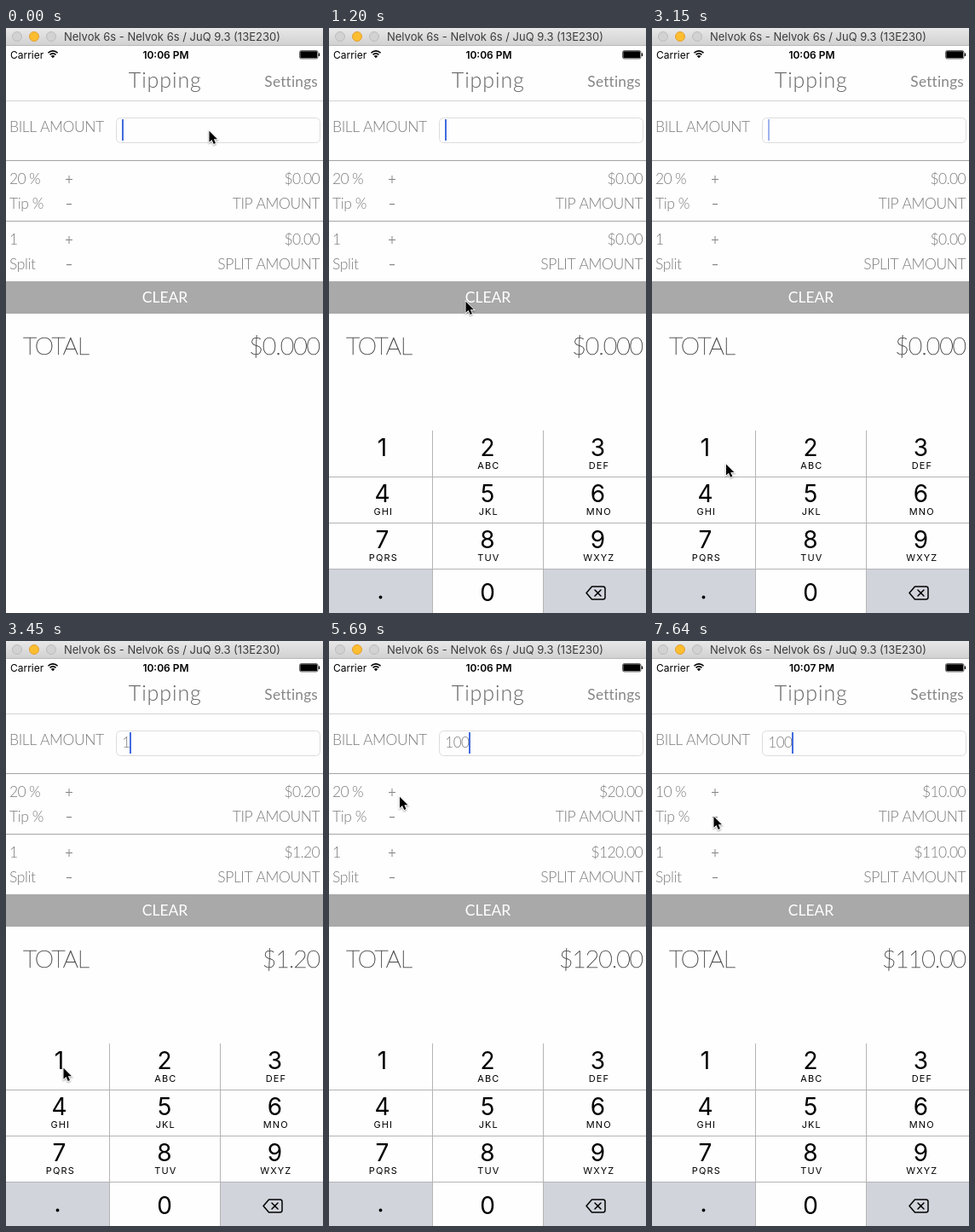
Recreate the animation shown at these times as an HTML page with a canvas. Size 372 by 686 pixels, loop 8 s.

```html
<!DOCTYPE html>
<html lang="en">
<head>
<meta charset="utf-8">
<title>Tip calculator</title>
<style>
  html, body { margin: 0; width: 100%; height: 100%; overflow: hidden; background: #fefefe; }
  canvas { display: block; width: 372px; height: 686px; }
</style>
</head>
<body>
<canvas id="stage"></canvas>
<script>
const W = 372, H = 686, LOOP = 8000;
const THIN = 'Lato, "Open Sans", sans-serif';
const SYSTEM = 'Inter, Roboto, sans-serif';
const KEY_GRAY = '#d1d4db';
const DIGIT_WIDTH = 28 / 3;
const canvas = document.getElementById('stage');
const ctx = canvas.getContext('2d');
const ratio = window.devicePixelRatio || 1;
canvas.width = W * ratio;
canvas.height = H * ratio;

// Pointer path: [time, x, y]
const pointerPath = [
  [0, 238, 120], [750, 238, 120], [1200, 160, 320], [1650, 81, 490], [1950, 158, 518],
  [2550, 158, 518], [2850, 142, 541], [3300, 67, 500], [3450, 67, 500], [3600, 109, 535],
  [4050, 204, 667], [4950, 204, 667], [5690, 82.5, 182], [6140, 72, 205]
];
// Caret opacity, held until the next entry: [time, alpha]
const caretBlink = [
  [0, 1], [300, .5], [450, 0], [900, .5], [1050, 1], [1350, .5], [1500, 0],
  [1800, .5], [1950, 1], [2250, .5], [2400, 0], [2700, .5], [2850, 1], [3150, .5],
  [3300, 1], [5100, .5], [5240, 0], [5540, .5], [5690, 1], [5990, .5], [6140, 0],
  [6440, .5], [6590, 1], [6890, .5], [7040, 0], [7490, .5], [7640, 1]
];
const billEntry = [[0, ''], [3300, '1'], [4200, '10'], [4500, '100']];

const held = (list, t) => list.filter(entry => entry[0] <= t).pop()[1];
const money = value => '$' + value.toFixed(2);

// The picture refreshes every 150 ms, with one short tick after 5100.
function snap(t) {
  if (t < 5100) return Math.floor(t / 150) * 150;
  return t < 5240 ? 5100 : 5240 + Math.floor((t - 5240) / 150) * 150;
}

function pointerAt(t) {
  const next = pointerPath.findIndex(p => p[0] > t);
  if (next < 0) return pointerPath[pointerPath.length - 1].slice(1);
  const [t0, x0, y0] = pointerPath[next - 1], [t1, x1, y1] = pointerPath[next];
  const k = (t - t0) / (t1 - t0), ease = k * k * (3 - 2 * k);
  return [x0 + (x1 - x0) * ease, y0 + (y1 - y0) * ease];
}

function text(str, x, y, { size = 17.5, weight = 300, family = THIN, color = '#777', align = 'left', spacing = 0, embolden = 0 } = {}) {
  ctx.font = `${weight} ${size}px ${family}`;
  ctx.letterSpacing = spacing + 'px';
  ctx.textAlign = align;
  ctx.fillStyle = ctx.strokeStyle = color;
  ctx.fillText(str, x, y);
  if (!embolden) return;
  ctx.lineWidth = embolden;
  ctx.lineJoin = 'round';
  ctx.strokeText(str, x, y);
}

function rect(x, y, w, h, color) {
  ctx.fillStyle = color;
  ctx.fillRect(x, y, w, h);
}

function dot(x, y, r, fill, border) {
  ctx.beginPath();
  ctx.arc(x, y, r, 0, Math.PI * 2);
  ctx.fillStyle = fill;
  ctx.fill();
  if (!border) return;
  ctx.strokeStyle = border;
  ctx.lineWidth = 1;
  ctx.stroke();
}

function drawTitleBar() {
  const shade = ctx.createLinearGradient(0, 0, 0, 20);
  shade.addColorStop(0, '#e9e8e9');
  shade.addColorStop(1, '#d2d1d2');
  rect(0, 0, W, 20, shade);
  rect(0, 20, W, 1, '#b9b8b9');
  dot(13, 10, 5.5, '#d3d2d3', '#bdbcbd');
  dot(33, 10, 5.5, '#fdbd30', '#e2a032');
  dot(53, 10, 5.5, '#d3d2d3', '#bdbcbd');
  text('Nelvok 6s - Nelvok 6s / JuQ 9.3 (13E230)', 68, 15, { size: 13, weight: 400, family: SYSTEM, color: '#3c3c3c' });
}

function drawBattery() {
  ctx.beginPath();
  ctx.roundRect(344.5, 26.5, 21.5, 9.5, 2);
  ctx.strokeStyle = '#000';
  ctx.lineWidth = .6;
  ctx.stroke();
  ctx.beginPath();
  ctx.roundRect(345.3, 27.3, 19.9, 7.9, 1);
  ctx.fillStyle = '#000';
  ctx.fill();
  rect(366.8, 29.5, 1.3, 3.5, '#000');
}

function drawStatusBar(clock) {
  text('Carrier', 5, 35.5, { size: 12, weight: 400, family: SYSTEM, color: '#000' });
  text(clock, 187.5, 35.5, { size: 12, weight: 600, family: SYSTEM, color: '#000', align: 'center' });
  ctx.strokeStyle = '#000';
  ctx.lineWidth = 1.6;
  for (const r of [4.9, 7.9]) {
    ctx.beginPath();
    ctx.arc(55, 34.8, r, -Math.PI * .75, -Math.PI * .25);
    ctx.stroke();
  }
  ctx.beginPath();
  ctx.moveTo(55, 35.3);
  ctx.arc(55, 35.3, 3.2, -Math.PI * .75, -Math.PI * .25);
  ctx.fillStyle = '#000';
  ctx.fill();
  drawBattery();
}

function drawPlusMinus(y, minusAlpha) {
  rect(70, y, 8, 1, '#858585');
  rect(73.5, y - 4, 1, 9, '#858585');
  ctx.globalAlpha = minusAlpha;
  rect(71, y + 29, 6, 1.2, '#858585');
  ctx.globalAlpha = 1;
}

function drawForm(t) {
  const bill = held(billEntry, t);
  const amount = Number(bill);
  const clicks = Math.max(0, Math.min(7, Math.floor((t - 6440) / 150) + 1));
  const percent = 20 - Math.round(clicks * 10 / 7);
  const tip = amount * percent / 100, total = amount + tip;
  const label = { size: 17.5, color: '#7c7c7c', spacing: -.42 };
  const digits = { size: 17.5, color: '#7c7c7c', spacing: -.65 };
  const right = style => ({ ...style, align: 'right' });

  text('Tipping', 186.8, 70, { size: 25, color: '#666', spacing: .9, align: 'center' });
  text('Settings', 366, 69, { size: 17.3, weight: 400, color: '#868686', align: 'right', spacing: .2 });
  rect(0, 85, W, 1, '#d4d4d4');

  text('BILL AMOUNT', 4, 122, label);
  ctx.beginPath();
  ctx.roundRect(129.5, 105.5, 239, 29, 5);
  ctx.strokeStyle = '#dcdcdc';
  ctx.lineWidth = 1;
  ctx.stroke();
  text(bill, 136.3, 125, { size: 17, color: '#7c7c7c', spacing: -.53 });
  ctx.globalAlpha = held(caretBlink, t);
  rect(136 + Math.round(bill.length * DIGIT_WIDTH), 107, 2, 25, '#426bde');
  ctx.globalAlpha = 1;

  rect(0, 155, W, 1, '#a5a5a5');
  text(percent + ' %', 4, 183, digits);
  text('Tip %', 4, 212, label);
  text(money(tip), 368, 183, right(digits));
  text('TIP AMOUNT', 368.3, 212, right(label));
  drawPlusMinus(177, t >= 6440 && t < 7640 ? .35 : 1);

  rect(0, 226, W, 1, '#a5a5a5');
  text('1', 4, 254, digits);
  text('Split', 4, 283, label);
  text(money(total), 368, 254, right(digits));
  text('SPLIT AMOUNT', 368.3, 283, right(label));
  drawPlusMinus(248, 1);

  rect(0, 297, W, 38, '#a9a9a9');
  text('CLEAR', 186.5, 322, { weight: 400, color: '#fff', align: 'center' });

  const big = { size: 28.5, weight: 200, color: '#4a4a4a', spacing: -1.1, embolden: .5 };
  text('TOTAL', 20, 383, big);
  text(bill ? money(total) : '$0.000', 368, 383, right(big));
}

function drawBackspace(x, y) {
  ctx.strokeStyle = '#000';
  ctx.lineWidth = 1.5;
  ctx.lineJoin = ctx.lineCap = 'round';
  ctx.beginPath();
  ctx.moveTo(x - 11, y);
  ctx.lineTo(x - 4.5, y - 7.5);
  ctx.arcTo(x + 11, y - 7.5, x + 11, y, 2.5);
  ctx.arcTo(x + 11, y + 7.5, x, y + 7.5, 2.5);
  ctx.lineTo(x - 4.5, y + 7.5);
  ctx.closePath();
  for (const s of [-1, 1]) {
    ctx.moveTo(x - 1, y - 3.5 * s);
    ctx.lineTo(x + 6, y + 3.5 * s);
  }
  ctx.stroke();
}

function drawKeyboard(t) {
  if (t < 750) return;
  const letters = ['', 'ABC', 'DEF', 'GHI', 'JKL', 'MNO', 'PQRS', 'TUV', 'WXYZ'];
  const centers = [62.5, 186, 315.5];
  const digit = { size: 28, weight: 400, family: SYSTEM, color: '#000', align: 'center' };
  const small = { size: 11, weight: 400, family: SYSTEM, color: '#000', align: 'center', spacing: 1.1 };

  ctx.save();
  ctx.translate(0, t < 900 ? 15 : t < 1050 ? 2 : 0);
  rect(0, 472, W, 230, '#fefefe');
  rect(0, 634, 121, 68, KEY_GRAY);
  rect(252, 634, 120, 68, KEY_GRAY);
  if (t >= 3300 && t < 3450) rect(0, 472, 121, 54, KEY_GRAY);
  if (t >= 4200 && t < 4500) rect(122, 634, 129, 68, KEY_GRAY);
  for (const y of [526, 580, 634]) rect(0, y, W, 1, '#b4b4b6');
  for (const x of [121, 251]) rect(x, 472, 1, 230, '#b4b4b6');

  letters.forEach((group, i) => {
    const x = centers[i % 3], y = 502 + Math.floor(i / 3) * 54;
    text(String(i + 1), x, y, digit);
    text(group, x + 1.3, y + 15, small);
  });
  text('0', 186, 672, digit);
  dot(60.5, 667.5, 1.9, '#000');
  drawBackspace(313, 662.5);
  ctx.restore();
}

function drawPointer(t) {
  const [x, y] = pointerAt(t);
  const outline = [[0, 0], [0, 14.2], [3.3, 11.2], [5.7, 16.6], [8.1, 15.5], [5.8, 10.4], [10.3, 10.4]];
  ctx.save();
  ctx.translate(x + .5, y + .8);
  ctx.scale(.92, .92);
  ctx.beginPath();
  outline.forEach(p => ctx.lineTo(...p));
  ctx.closePath();
  ctx.lineJoin = 'miter';
  ctx.lineWidth = 1.8;
  ctx.strokeStyle = '#fff';
  ctx.shadowColor = 'rgba(0,0,0,.4)';
  ctx.shadowBlur = 2 * ratio;
  ctx.shadowOffsetY = ratio;
  ctx.stroke();
  ctx.shadowColor = 'transparent';
  ctx.fillStyle = '#000';
  ctx.fill();
  ctx.restore();
}

function draw(now) {
  const t = snap(now % LOOP);
  ctx.setTransform(ratio, 0, 0, ratio, 0, 0);
  rect(0, 0, W, H, '#fefefe');
  drawTitleBar();
  drawStatusBar(t < 5990 ? '10:06 PM' : '10:07 PM');
  drawForm(t);
  drawKeyboard(t);
  drawPointer(t);
}

let start;
function tick(now) {
  start ??= now;
  draw(now - start);
  requestAnimationFrame(tick);
}
draw(0);
requestAnimationFrame(tick);
</script>
</body>
</html>
```
